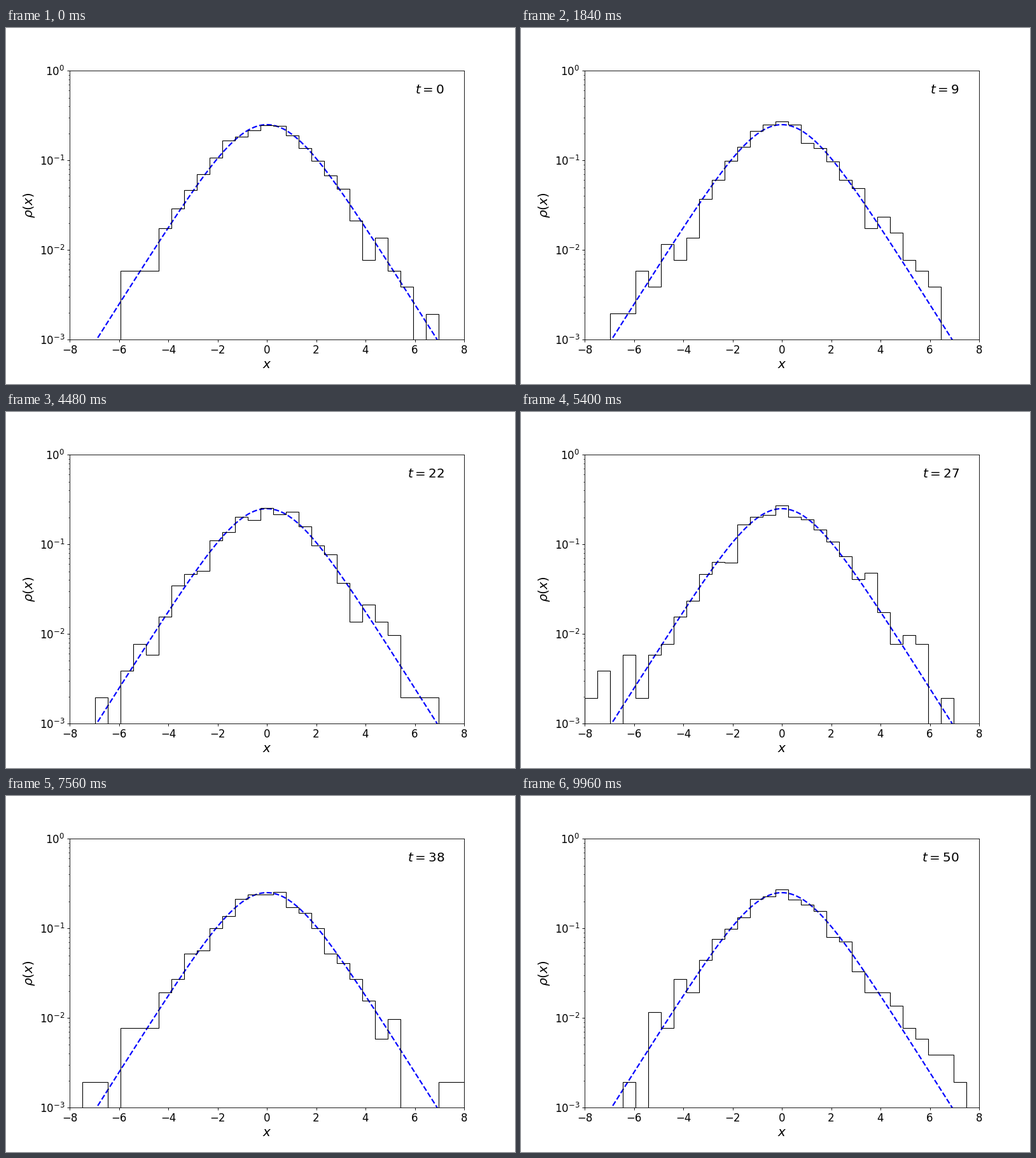
Animation of 800x560 px, one loop 10000 ms. Source, as a matplotlib script:

```python
import numpy as np
import matplotlib.pyplot as plt
from matplotlib.animation import FuncAnimation
from matplotlib.ticker import NullFormatter

FRAMES, STEP_MS = 250, 40
DT = 0.2              # simulated time per frame
SUBSTEPS = 4
PARTICLES = 1000
FLOOR = 1e-5          # stands in for empty bins on the log axis

edges = np.linspace(-8, 8, 32)


def densities():
    """Histograms of Langevin motion whose resting density is sech^2(x/2)/4."""
    rng = np.random.default_rng(7)
    x = rng.logistic(size=PARTICLES)
    h = DT / SUBSTEPS
    rows = []
    for _ in range(FRAMES):
        rows.append(np.histogram(x, edges, density=True)[0])
        for _ in range(SUBSTEPS):
            x += -np.tanh(x / 2) * h + np.sqrt(2 * h) * rng.normal(size=x.size)
    return np.maximum(rows, FLOOR)


rho = densities()

fig, ax = plt.subplots(figsize=(10, 7), dpi=80)
fig.subplots_adjust(left=0.125, right=0.9, bottom=0.125, top=0.88)
ax.set_yscale("log")
ax.set_xlim(-8, 8)
ax.set_ylim(1e-3, 1)
ax.tick_params(labelsize=15)
ax.yaxis.set_minor_formatter(NullFormatter())
ax.set_xlabel("$x$", size=18)
ax.set_ylabel(r"$\rho(x)$", size=18)

xs = np.linspace(-8, 8, 401)
ax.plot(xs, 0.25 / np.cosh(xs / 2) ** 2, "b--", lw=2)
steps = ax.stairs(rho[0], edges, baseline=FLOOR, color="k", lw=1, zorder=2.2)
clock = ax.text(0.95, 0.95, "", transform=ax.transAxes, size=18,
                ha="right", va="top")


def draw(i):
    steps.set_data(rho[i])
    clock.set_text(f"$t={i * DT:.0f}$")
    return steps, clock


anim = FuncAnimation(fig, draw, frames=FRAMES, interval=STEP_MS, repeat=True,
                     repeat_delay=0)
plt.show()
```
